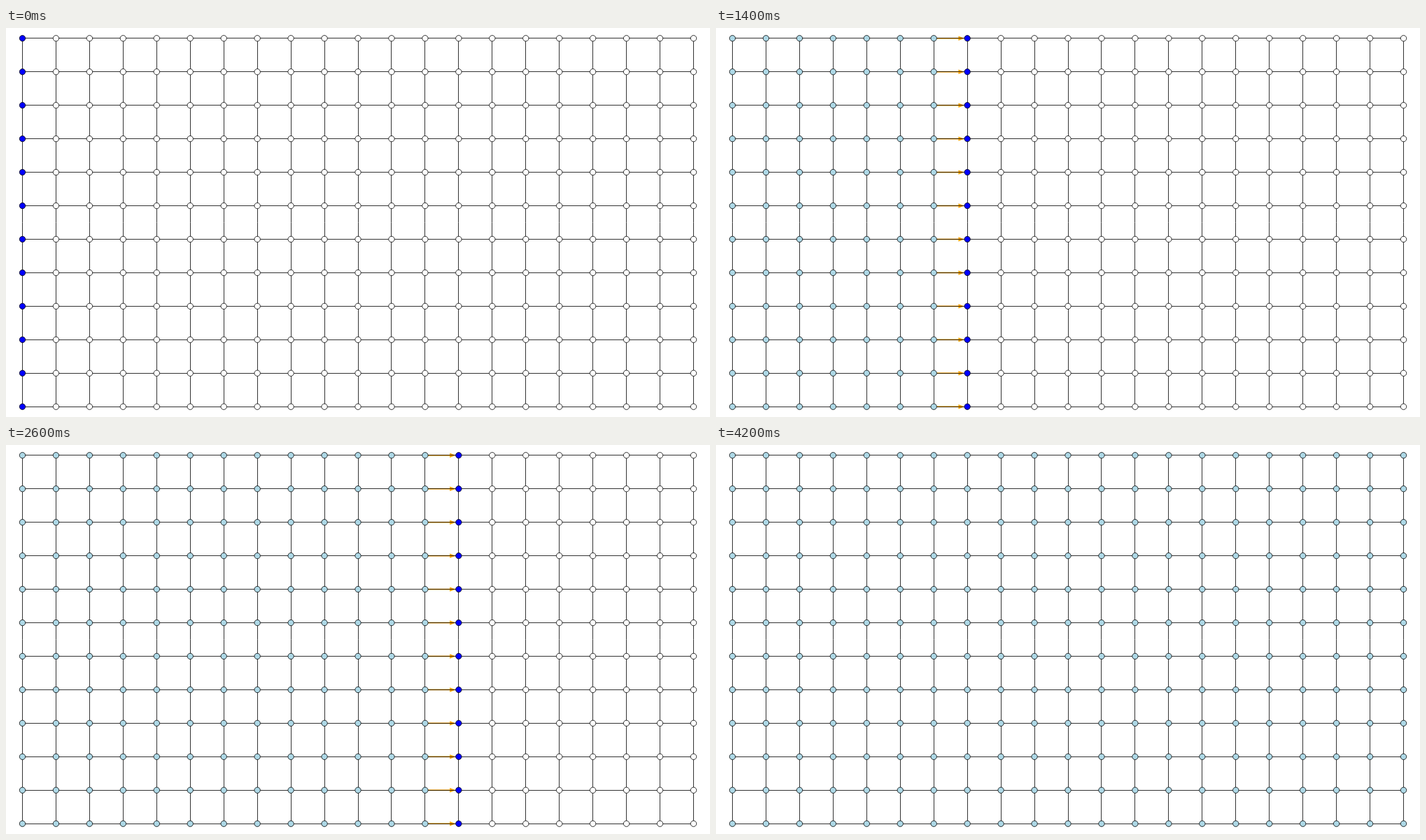
An HTML page with a canvas that plays this animation: 1006x557 px, repeating every 4400 ms.

```html
<!DOCTYPE html>
<html>
<head>
<meta charset="utf-8">
<style>
  html, body { margin: 0; width: 100%; height: 100%; overflow: hidden; background: #fff; }
  canvas { display: block; }
</style>
</head>
<body>
<canvas id="stage" width="1006" height="557"></canvas>
<script>
const ctx = document.getElementById('stage').getContext('2d');
const COLS = 21, ROWS = 12, GAP = 47.95, RADIUS = 4.2, STEP = 200;
const colX = c => 503 + (c - (COLS - 1) / 2) * GAP;
const rowY = r => 278.5 + (r - (ROWS - 1) / 2) * GAP;
const snap = v => Math.floor(v) + 0.5;

function line(x1, y1, x2, y2, color, width) {
  ctx.strokeStyle = color;
  ctx.lineWidth = width;
  ctx.beginPath();
  ctx.moveTo(x1, y1);
  ctx.lineTo(x2, y2);
  ctx.stroke();
}

function arrow(from, y) {
  const start = colX(from) + RADIUS, tip = colX(from + 1) - RADIUS;
  line(start, y, tip - 8, y, '#ffa500', 1.7);
  ctx.fillStyle = '#ffa500';
  ctx.beginPath();
  ctx.moveTo(tip, y);
  ctx.lineTo(tip - 8.5, y - 3.2);
  ctx.lineTo(tip - 8.5, y + 3.2);
  ctx.fill();
}

function node(x, y, color) {
  ctx.fillStyle = color;
  ctx.strokeStyle = '#000';
  ctx.lineWidth = 0.8;
  ctx.beginPath();
  ctx.arc(x, y, RADIUS, 0, 2 * Math.PI);
  ctx.fill();
  ctx.stroke();
}

function draw(front) {
  ctx.fillStyle = '#fff';
  ctx.fillRect(0, 0, 1006, 557);
  if (front > 0 && front < COLS)
    for (let r = 0; r < ROWS; r++) arrow(front - 1, rowY(r));
  for (let c = 0; c < COLS; c++)
    line(snap(colX(c)), rowY(0), snap(colX(c)), rowY(ROWS - 1), '#000', 0.8);
  for (let r = 0; r < ROWS; r++)
    line(colX(0), snap(rowY(r)), colX(COLS - 1), snap(rowY(r)), '#000', 0.8);
  for (let c = 0; c < COLS; c++) {
    const color = c < front ? '#add8e6' : c === front ? '#00f' : '#fff';
    for (let r = 0; r < ROWS; r++) node(colX(c), rowY(r), color);
  }
}

const begin = performance.now();
function tick() {
  draw(Math.floor((performance.now() - begin) / STEP) % (COLS + 1));
  requestAnimationFrame(tick);
}
tick();
</script>
</body>
</html>
```
